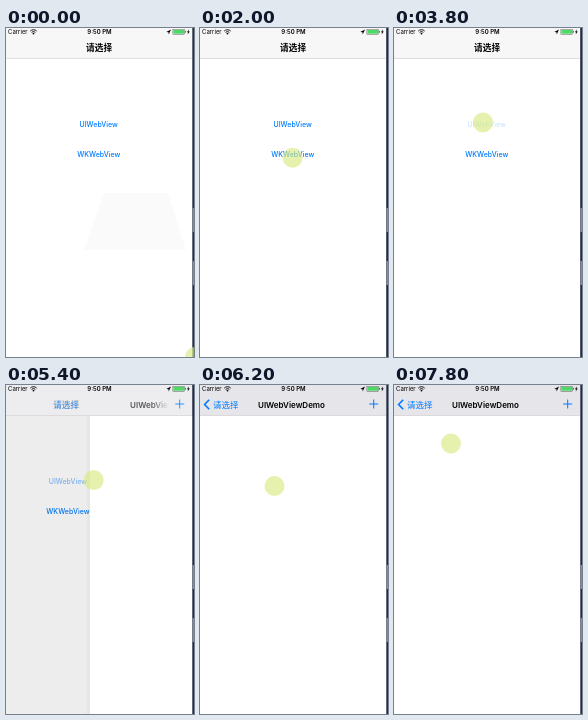
An HTML page with a canvas for the animation above (8 s loop, 188 px wide and 329 px high).

```html
<!DOCTYPE html>
<html lang="zh-CN">
<head>
<meta charset="utf-8">
<title>WebView demo</title>
<style>
html, body { margin: 0; width: 100%; height: 100%; overflow: hidden; background: #fff; }
canvas { display: block; width: 188px; height: 329px; }
</style>
</head>
<body>
<canvas id="stage"></canvas>
<script>
const W = 188, H = 329, SCREEN = 186.5, NAV = 30.5;
const LOOP = 8000, STEP = 200;
const BLUE = '#007aff';
const LATIN = 'Inter, "Liberation Sans", sans-serif';
const HAN = '"Noto Sans CJK SC", "Noto Sans CJK", sans-serif';

const canvas = document.getElementById('stage');
const ctx = canvas.getContext('2d');
const ratio = window.devicePixelRatio || 1;
canvas.width = Math.round(W * ratio);
canvas.height = Math.round(H * ratio);

const easeIn = n => k => Math.pow(k, n);
const easeOut = n => k => 1 - Math.pow(1 - k, n);
const clamp = v => Math.min(1, Math.max(0, v));
const span = (t, from, to) => clamp((t - from) / (to - from));

// Each move carries the pointer on from where the last one ended
const home = { x: 189, y: 329 };
const moves = [
  { from: 400, to: 1600, x: 95.5, y: 154.5, ex: easeIn(1.8), ey: easeIn(2.9) },
  { from: 1600, to: 2800, x: 88.7, y: 97.2, ex: easeOut(1.4), ey: easeOut(1.4) },
  { from: 2800, to: 3800, x: 89, y: 94.5, ex: easeOut(2), ey: easeOut(2) },
  { from: 5200, to: 6200, x: 74.5, y: 101, ex: easeIn(1.5), ey: easeIn(1.5) },
  { from: 6200, to: 7800, x: 57, y: 58.5, ex: easeOut(3), ey: easeOut(5.7) }
];

function pointerAt(t) {
  let { x, y } = home;
  for (const m of moves) {
    const k = span(t, m.from, m.to);
    x += (m.x - x) * m.ex(k);
    y += (m.y - y) * m.ey(k);
  }
  return { x, y };
}

const pushAt = t => easeOut(2.78)(span(t, 5200, 6000));
const linkAlpha = t => t < 3000 ? 1 : 0.2 + 0.8 * span(t, 5200, 5750);

function rect(x, y, w, h, color) {
  ctx.fillStyle = color;
  ctx.fillRect(x, y, w, h);
}

function label(str, x, y, font, color, alpha = 1, align = 'left') {
  ctx.save();
  ctx.globalAlpha = alpha;
  ctx.font = font;
  ctx.fillStyle = color;
  ctx.textAlign = align;
  ctx.fillText(str, x, y);
  ctx.restore();
}

function line(points, width, color, alpha = 1) {
  ctx.save();
  ctx.globalAlpha = alpha;
  ctx.lineWidth = width;
  ctx.strokeStyle = color;
  ctx.beginPath();
  points.forEach(([x, y]) => ctx.lineTo(x, y));
  ctx.stroke();
  ctx.restore();
}

function shape(points, color) {
  ctx.fillStyle = color;
  ctx.beginPath();
  points.forEach(([x, y]) => ctx.lineTo(x, y));
  ctx.fill();
}

function disc(x, y, r, color) {
  ctx.fillStyle = color;
  ctx.beginPath();
  ctx.arc(x, y, r, 0, Math.PI * 2);
  ctx.fill();
}

function drawMenu(p, alpha, ghost) {
  const x = 92.7 - 0.3 * SCREEN * p;
  const font = '500 7px ' + LATIN;
  rect(0, NAV, SCREEN, H - NAV, '#fff');
  if (ghost) shape([[98, 165], [162, 165], [180, 222], [78, 222]], '#fbfafa');
  label('UIWebView', x, 99.2, font, BLUE, alpha, 'center');
  label('WKWebView', x, 129.2, font, BLUE, 1, 'center');
  rect(0, NAV, SCREEN, H - NAV, `rgba(0,0,0,${0.13 * p})`);
}

function drawPage(p) {
  const x = SCREEN * (1 - p);
  if (p < 1) {
    const g = ctx.createLinearGradient(x - 4, 0, x, 0);
    g.addColorStop(0, 'rgba(0,0,0,0)');
    g.addColorStop(1, 'rgba(0,0,0,0.06)');
    rect(x - 4, NAV, 4, H - NAV, g);
  }
  rect(x, NAV, SCREEN - x, H - NAV, '#fff');
}

function drawNav(p) {
  rect(0, 0, SCREEN, NAV, '#f7f7f7');
  ctx.globalAlpha = p;
  rect(0, 0, SCREEN, NAV, '#e6e6ea');
  ctx.globalAlpha = 1;
  rect(0, 30, SCREEN, 0.5, '#c8c8cb');

  const x = 80 - 67 * Math.pow(p, 1.2);
  label('请选择', x, 23, '700 8.7px ' + HAN, '#000', clamp(1 - p * 1.5));
  if (p === 0) return;
  label('请选择', x, 23, '400 8.5px ' + HAN, BLUE, clamp(p * 1.3));
  line([[9.2, 14.8], [4.6, 19.5], [9.2, 24.2]], 1.6, BLUE, span(p, 0.6, 1));

  const fade = ctx.createLinearGradient(145, 0, 163, 0);
  fade.addColorStop(0, '#000');
  fade.addColorStop(1, 'rgba(0,0,0,0)');
  label('UIWebViewDemo', 58 + 147 * (1 - p), 22.6, '600 8px ' + LATIN, fade, clamp(p * 1.15));

  const a = clamp(p * 1.4);
  line([[169.2, 19], [178.2, 19]], 1, BLUE, a);
  line([[173.7, 14.5], [173.7, 23.5]], 1, BLUE, a);
}

function drawStatus() {
  label('Carrier', 2, 6.1, '400 6px ' + LATIN, '#000');
  label('9:50 PM', 93.5, 6.1, '600 6px ' + LATIN, '#000', 1, 'center');

  ctx.strokeStyle = '#000';
  ctx.lineWidth = 0.9;
  for (const r of [2.6, 4.5]) {
    ctx.beginPath();
    ctx.arc(27.5, 6.2, r, -Math.PI * 0.76, -Math.PI * 0.24);
    ctx.stroke();
  }
  disc(27.5, 5.6, 0.9, '#000');

  shape([[160.2, 4], [165, 1.6], [162.7, 6.4], [162.5, 4.2]], '#000');
  ctx.lineWidth = 0.4;
  ctx.strokeStyle = '#333';
  ctx.strokeRect(166.9, 1.4, 11.8, 4.8);
  rect(167.4, 1.9, 10.8, 3.8, '#4cd964');
  rect(179.1, 2.9, 0.7, 1.8, '#333');
  shape([[182.8, 1.2], [181, 4.2], [182.2, 4.2], [181.6, 6.6], [183.8, 3.4], [182.5, 3.4]], '#000');
}

// Sliver of desktop beside the screen
function drawEdge() {
  rect(SCREEN, 0, W - SCREEN, H, '#232e46');
  for (const y of [180, 233]) rect(SCREEN, y, W - SCREEN, 24, '#858c98');
}

function draw(t) {
  const p = pushAt(t);
  const { x, y } = pointerAt(t);
  ctx.setTransform(ratio, 0, 0, ratio, 0, 0);
  ctx.save();
  ctx.beginPath();
  ctx.rect(0, 0, SCREEN, H);
  ctx.clip();
  drawMenu(p, linkAlpha(t), t < 600);
  if (p > 0) drawPage(p);
  drawNav(p);
  drawStatus();
  ctx.restore();
  drawEdge();
  disc(x, y, 10, 'rgba(217,233,131,0.65)');
}

const start = performance.now();
function tick() {
  const t = (performance.now() - start) % LOOP;
  draw(Math.floor(t / STEP) * STEP);
  requestAnimationFrame(tick);
}
tick();
</script>
</body>
</html>
```
